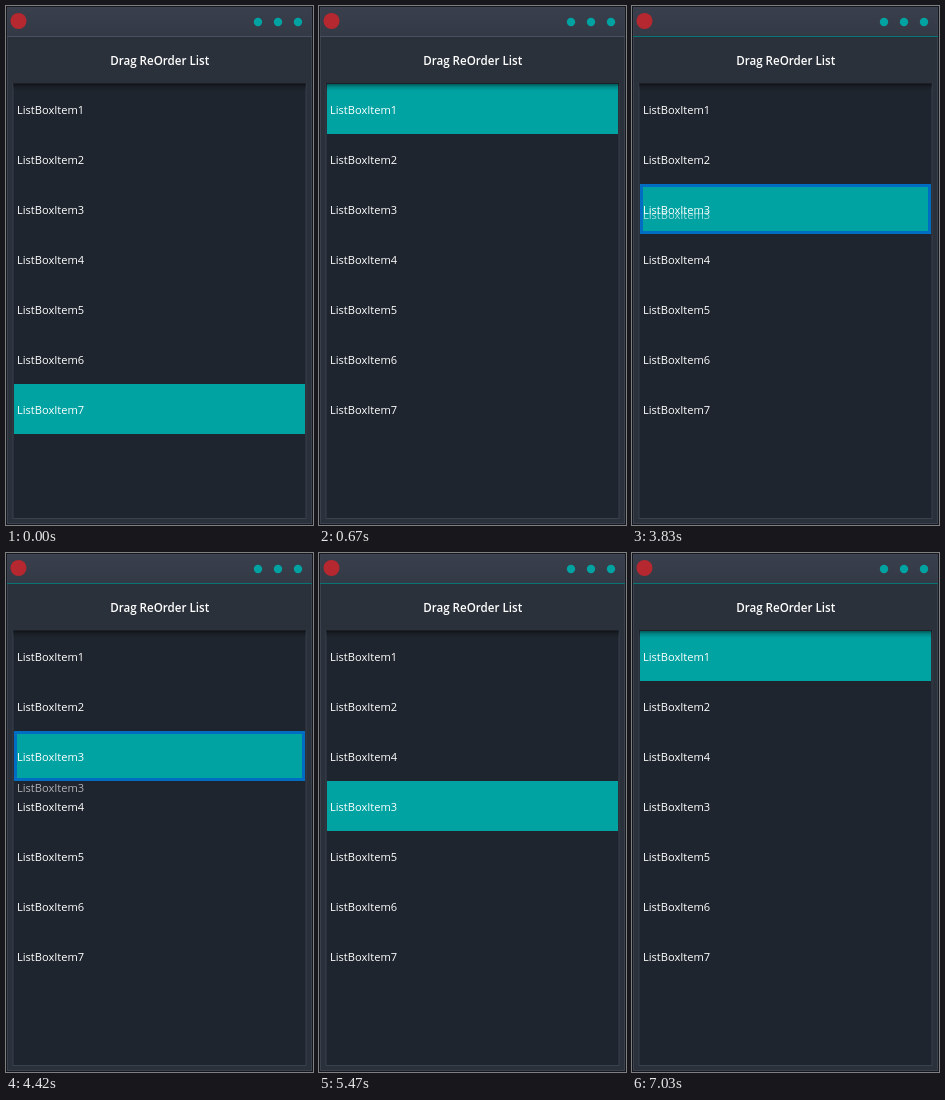
An HTML page with a canvas that plays this animation: 307 px wide and 519 px high, repeating every 8000 ms.

```html
<!DOCTYPE html>
<html lang="en">
<head>
<meta charset="utf-8">
<title>Drag ReOrder List</title>
<style>
  html, body { margin: 0; height: 100%; overflow: hidden; background: #2b313b; }
  canvas { display: block; }
</style>
</head>
<body>
<canvas id="stage" width="307" height="519"></canvas>
<script>
const ctx = document.getElementById('stage').getContext('2d');
const LOOP = 8000, ROW = 50, TOP = 78;
const FOCUS = 3520, GRAB = 3560, DROP = 5470;
const TEAL = '#00a2a2', WHITE = '#fff';
const FONT = 'px "Open Sans", "Noto Sans", sans-serif';

// How many of `count` ticks, `gap` ms apart, have passed since `start`.
const ticks = (t, start, gap, count) =>
  Math.max(0, Math.min(count, Math.floor((t - start) / gap) + 1));

function selectedRow(t) {
  if (t < GRAB) return 6 - 2 * ticks(t, 530, 70, 3);
  if (t < DROP) return 2;
  return 3 - ticks(t, 6890, 70, 3);
}

function ghostShift(t) {
  const left = 1 - ticks(t, 4130, 61, 9) / 9;
  return Math.round(5 * ticks(t, 3830, 70, 2)
    + 26 * (1 - left * left)
    + 3 * ticks(t, 4890, 55, 3));
}

function rect(x, y, w, h, color) {
  ctx.fillStyle = color;
  ctx.fillRect(x, y, w, h);
}

function frame(x, y, w, h, color, line = 1) {
  ctx.strokeStyle = color;
  ctx.lineWidth = line;
  ctx.strokeRect(x + line / 2, y + line / 2, w - line, h - line);
}

function dot(x, y, r, color) {
  ctx.fillStyle = color;
  ctx.beginPath();
  ctx.arc(x, y, r, 0, Math.PI * 2);
  ctx.fill();
}

function fade(y, h, ...colors) {
  const g = ctx.createLinearGradient(0, y, 0, y + h);
  colors.forEach((c, i) => g.addColorStop(i / (colors.length - 1), c));
  return g;
}

function label(text, x, y, color = WHITE, font = '500 11.1' + FONT, align = 'left') {
  ctx.font = font;
  ctx.textAlign = align;
  ctx.fillStyle = color;
  ctx.fillText(text, x, y);
}

function drawWindow(active) {
  rect(0, 0, 307, 519, '#2b313b');
  rect(1, 1, 305, 29, fade(1, 29, '#393f4c', '#333a46'));
  frame(0, 0, 307, 519, '#14181e');
  frame(1, 1, 305, 517, '#3b424e');
  rect(1, 30, 305, 1, active ? '#087474' : '#495160');
  dot(12.5, 15, 8, '#b5282f');
  for (let x = 252; x < 300; x += 20) dot(x, 16, 4.2, TEAL);
  label('Drag ReOrder List', 153.7, 59, WHITE, '600 11.6' + FONT, 'center');
  rect(7, 77, 293, 436, '#1f252e');
  frame(6.5, 77, 294, 436, '#39414c');
}

function drawList(t) {
  const dragging = t >= GRAB && t < DROP;
  const order = t < DROP ? '1234567' : '1243567';
  rect(8, TOP + selectedRow(t) * ROW, 291, ROW, TEAL);
  if (dragging) {
    const target = t < 4890 ? 2 : 3;
    frame(8, TOP + target * ROW, 291, ROW, 'rgba(0,90,204,.75)', 3);
  }
  [...order].forEach((n, i) => label('ListBoxItem' + n, 11, 108 + i * ROW));
  if (dragging) label('ListBoxItem3', 11, 208 + ghostShift(t), 'rgba(255,255,255,.65)');
  rect(7, 77, 293, 8, fade(77, 8, 'rgba(0,0,0,.55)', 'rgba(0,0,0,.16)', 'rgba(0,0,0,0)'));
}

function draw() {
  const t = performance.now() % LOOP;
  drawWindow(t >= FOCUS);
  drawList(t);
  requestAnimationFrame(draw);
}
draw();
</script>
</body>
</html>
```
